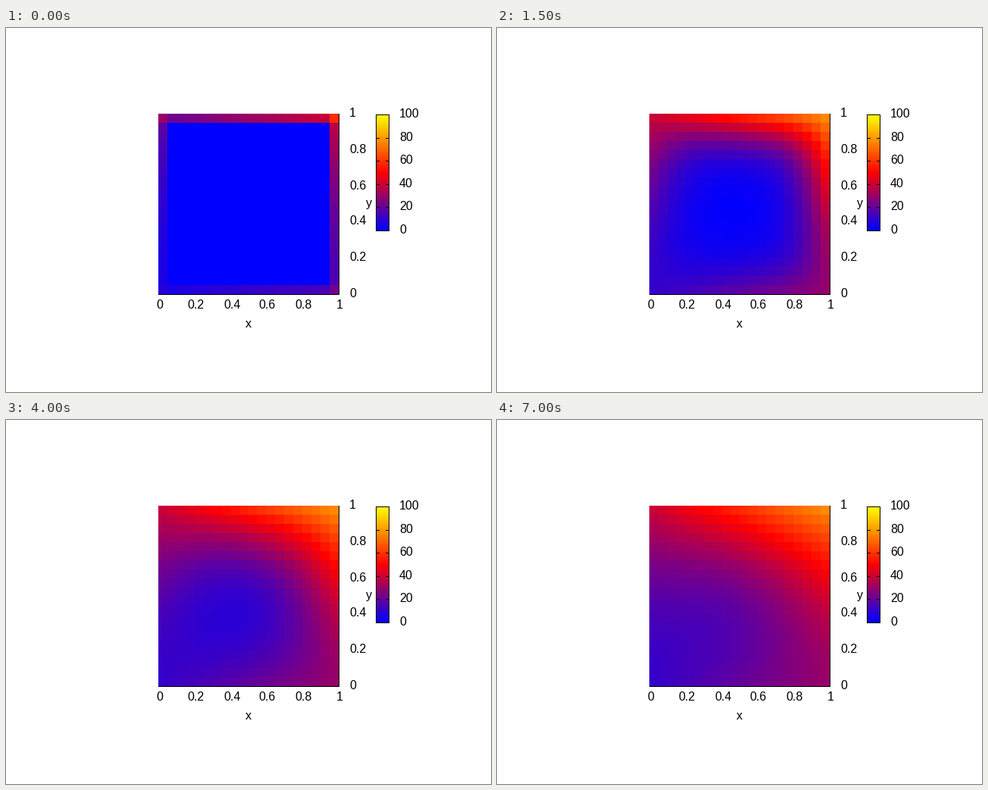
A matplotlib script for the animation above (8000 ms loop, 640 px wide and 480 px high).

```python
import numpy as np
import matplotlib.pyplot as plt
from matplotlib.animation import FuncAnimation
from matplotlib.colors import LinearSegmentedColormap
from matplotlib.patches import Rectangle

W, H, DPI = 640, 480, 100
N = 20                        # cells per side of the plate
LEFT, TOP, RIGHT, BOTTOM = 201, 113, 439, 351
BAR = (488, 505, 267, 114)    # left, right, bottom, top
STEP_MS = 500
R, SUBSTEPS = 0.2, 10         # diffusion number, sub-steps per picture

plt.rcParams["font.family"] = "Liberation Sans"
plt.rcParams["font.size"] = 16 * 72 / DPI


def start_field():
    s = np.linspace(0, 1, N + 1)
    u = np.zeros((N + 1, N + 1))      # u[y, x], y upwards
    u[0] = 10 + 20 * s
    u[-1] = 40 + 40 * s
    u[:, 0] = 10 + 30 * s**2
    u[:, -1] = 30 + 50 * s**2
    return u


def advance(u):
    u = u.copy()
    for _ in range(SUBSTEPS):
        c = u[1:-1, 1:-1]
        u[1:-1, 1:-1] = c + R * (u[2:, 1:-1] + u[:-2, 1:-1]
                                 + u[1:-1, 2:] + u[1:-1, :-2] - 4 * c)
    return u


def cell_means(u):
    return (u[1:, 1:] + u[1:, :-1] + u[:-1, 1:] + u[:-1, :-1]) / 4


fields = [start_field()]
for _ in range(15):
    fields.append(advance(fields[-1]))
cells = [cell_means(u)[::-1] for u in fields]    # top row first

heat = LinearSegmentedColormap.from_list(
    "heat", [(0, 0, 1), (1, 0, 0), (1, 1, 0)], N=256)

fig = plt.figure(figsize=(W / DPI, H / DPI), dpi=DPI, facecolor="white")
ax = fig.add_axes([0, 0, 1, 1])
ax.axis("off")


def line(x0, y0, x1, y1):
    """Black line, one pixel wide, end pixels included."""
    ax.add_patch(Rectangle((x0, y0), x1 - x0 + 1, y1 - y0 + 1, lw=0,
                           color="black", antialiased=False, zorder=3))


def label(x, y, text, ha="center"):
    ax.text(x, y, text, ha=ha, va="baseline", color="black")


# 12-pixel cells, with the two beside the middle one pixel narrower
k = np.arange(N + 1)
edges = 12 * k - (k >= N // 2) - (k > N // 2)
plate = ax.pcolormesh(LEFT + edges, TOP + edges, cells[0], cmap=heat,
                      vmin=0, vmax=100, antialiased=False)
line(LEFT, BOTTOM, RIGHT, BOTTOM)
line(RIGHT, TOP, RIGHT, BOTTOM)

for i in range(6):
    text = f"{i / 5:g}"
    label(LEFT + edges[4 * i] + 1.5, 370, text)
    label(453, BOTTOM - edges[4 * i] + 4, text, "left")
label(320, 395, "x")
label(479, 236, "y")

x0, x1, y0, y1 = BAR
ax.imshow(np.linspace(0, 1, 128)[:, None], cmap=heat, vmin=0, vmax=1,
          origin="lower", interpolation="nearest", aspect="auto",
          extent=(x0, x1, y0, y1))
line(x0, y0, x1, y0)
line(x0, y1, x1, y1)
line(x0, y1, x0, y0)
line(x1, y1, x1, y0)
for i in range(6):
    y = round(y0 + (y1 - y0) * i / 5)
    line(x0, y, x0 + 4, y)
    line(x1 - 4, y, x1, y)
    label(519, y + 4, f"{20 * i}", "left")

ax.set_xlim(0, W)
ax.set_ylim(H, 0)


def draw(i):
    # after three seconds the picture refreshes once a second
    step = i if i < 6 else min(i - i % 2, 14)
    plate.set_array(cells[step])
    return [plate]


anim = FuncAnimation(fig, draw, frames=16, interval=STEP_MS,
                     repeat=True, repeat_delay=0)
plt.show()
```
